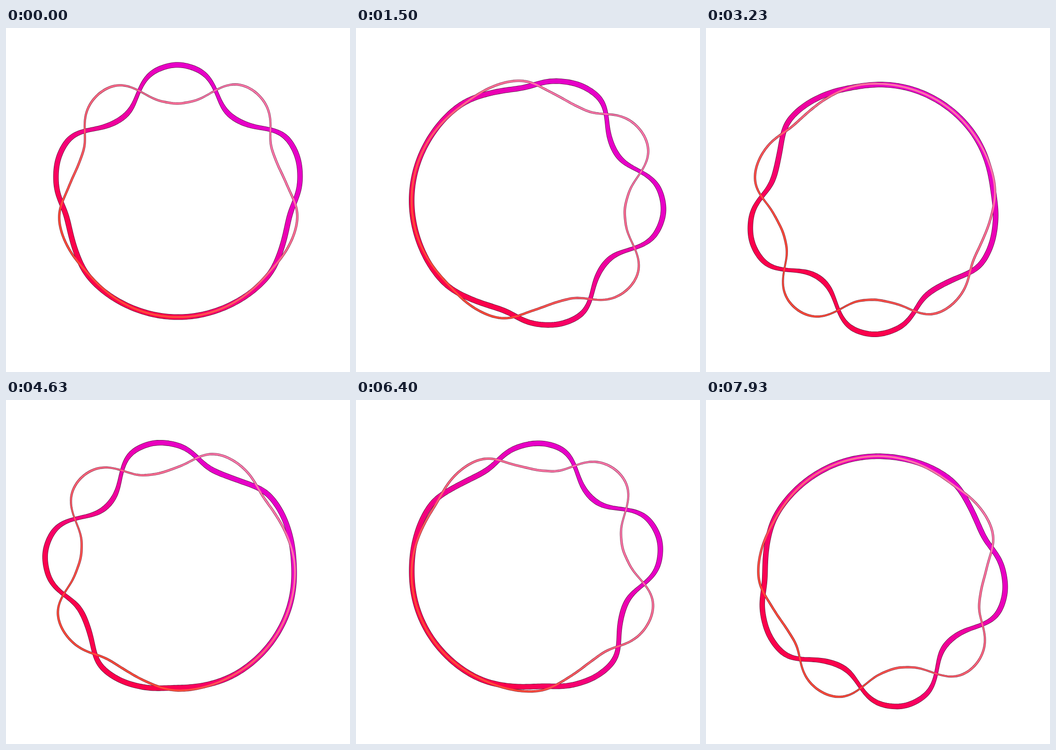
An HTML page with a canvas that plays this animation: 748x748 px, repeating every 8 s.

```html
<!DOCTYPE html>
<html lang="en">
<head>
<meta charset="utf-8">
<title>Circular waves</title>
<style>
  html, body { margin: 0; width: 100%; height: 100%; overflow: hidden; background: #fff; }
  canvas { display: block; width: 100vw; height: 100vh; object-fit: contain; }
</style>
</head>
<body>
<canvas id="stage" width="748" height="748"></canvas>
<script>
const ctx = document.getElementById('stage').getContext('2d');
const LOOP = 8000;
const CX = 374.2, CY = 375.4, RADIUS = 253.2, HEIGHT = 42, LOBES = 5;
const RAD = Math.PI / 180;
const EDGE = '#4a1030';

function diagonal(...stops) {
  const g = ctx.createLinearGradient(234, 514, 520, 228);
  stops.forEach((c, i) => g.addColorStop(i / (stops.length - 1), c));
  return g;
}
const bold = diagonal('#fb004c', '#f0009a', '#e700c8');
const fine = diagonal('#ff4b38', '#ff6478', '#ff78aa');

// Ten poses take 700 ms; the first of each ten is held for 100 ms.
function poseAt(ms) {
  const tick = Math.floor((ms + 5) * 0.03);
  const part = tick % 21;
  return Math.floor(tick / 21) * 10 + (part < 3 ? 0 : 1 + Math.floor((part - 3) / 2));
}

// Round crests, steep flanks, the crests a little wider than the troughs.
function wave(x) {
  const base = Math.cos(x) - 0.065 * Math.cos(3 * x) + 0.01 * Math.cos(5 * x);
  return base / 0.945 + 0.13 * Math.sin(x) ** 4;
}

function waveRadius(a, pose, sign) {
  const swell = 4.62 * pose;
  const phase = -0.4 - 2.3215 * pose;
  const envelope = Math.abs(Math.cos((a - swell) * RAD / 2)) ** 3;
  return RADIUS + sign * HEIGHT * envelope * wave(LOBES * (a - phase) * RAD);
}

// A band of constant radial depth, so it narrows on the steep flanks.
function band(pose, sign, depth) {
  const path = new Path2D();
  for (const side of [0.5, -0.5]) {
    for (let a = 0; a < 360; a++) {
      const r = waveRadius(a, pose, sign) + side * depth;
      const x = CX + r * Math.sin(a * RAD), y = CY - r * Math.cos(a * RAD);
      a ? path.lineTo(x, y) : path.moveTo(x, y);
    }
    path.closePath();
  }
  return path;
}

function outline(path) {
  ctx.strokeStyle = EDGE;
  ctx.lineWidth = 1.6;
  ctx.stroke(path);
}

function fill(path, style, alpha = 1) {
  ctx.globalAlpha = alpha;
  ctx.fillStyle = style;
  ctx.fill(path, 'evenodd');
  ctx.globalAlpha = 1;
}

function draw(ms) {
  const pose = poseAt(ms % LOOP);
  const thick = band(pose, 1, 10.4);
  const thin = band(pose, -1, 3.5);
  ctx.fillStyle = '#fff';
  ctx.fillRect(0, 0, 748, 748);
  outline(thick);
  outline(thin);
  fill(thick, bold);
  fill(band(pose, -1, 5.4), fine, 0.3);
  fill(thin, fine);
}

ctx.lineJoin = 'round';
const start = performance.now();
function frame() {
  draw(performance.now() - start);
  requestAnimationFrame(frame);
}
frame();
</script>
</body>
</html>
```
